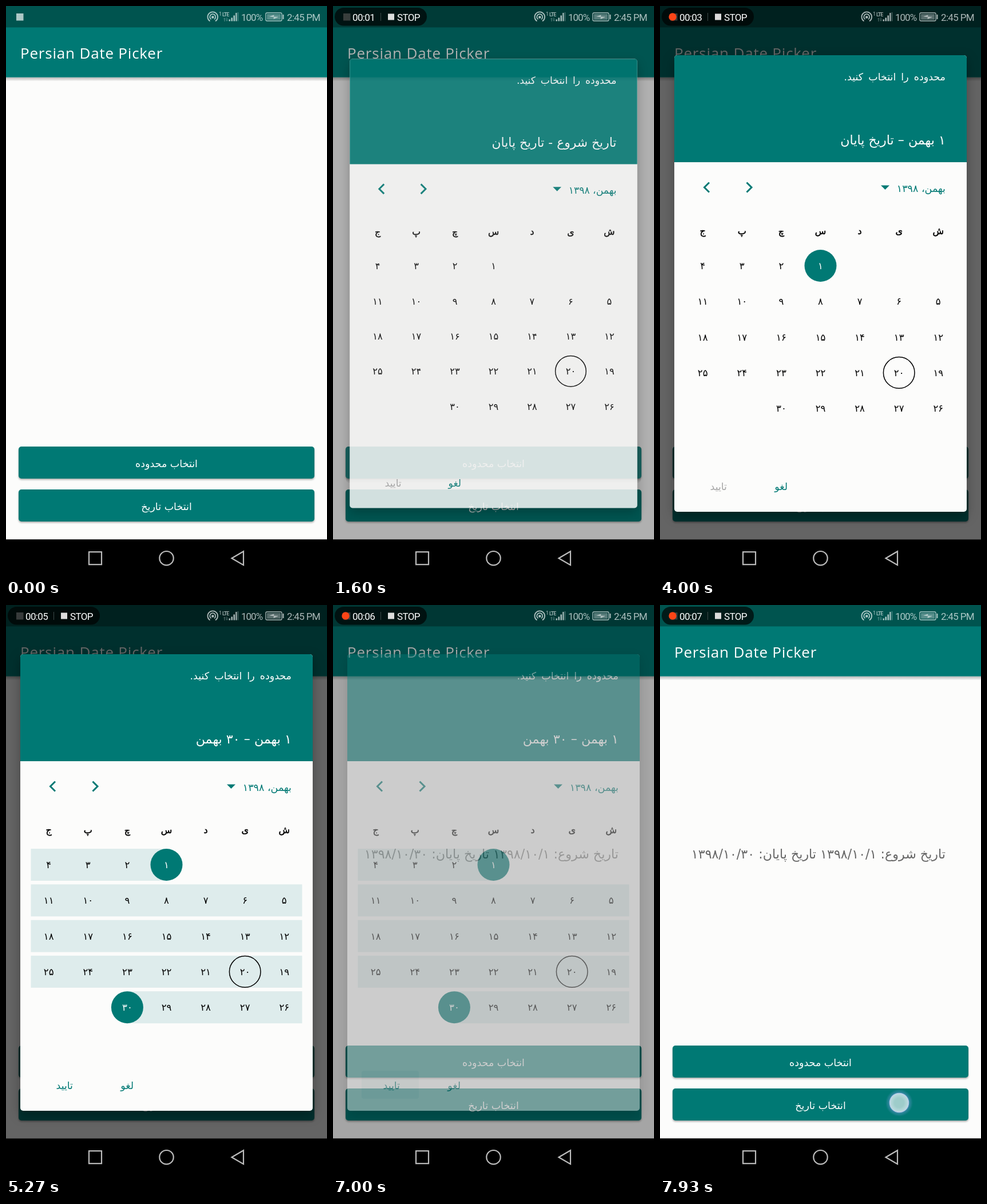
Write an HTML page that moves like this. It is 561x998 px and loops after 8000 ms.

```html
<!DOCTYPE html>
<html lang="en">
<head>
<meta charset="utf-8">
<title>Persian Date Picker</title>
<style>
  html, body { margin: 0; width: 100%; height: 100%; overflow: hidden; background: #000; }
  svg { display: block; width: 100vw; height: 100vh; }
  .fa { font-family: "DejaVu Sans", sans-serif; font-size: 17.5px; }
  .rtl { direction: rtl; }
  .mid { text-anchor: middle; }
  .big { font-size: 22.2px; }
  .hint { word-spacing: 3.5px; }
  .title { font: 26px "Open Sans", "Noto Sans", sans-serif; letter-spacing: .8px; }
  .sys { font: 17px Roboto, sans-serif; letter-spacing: -.65px; }
  .cell { font-size: 16.5px; }
  .week { font-size: 16px; stroke: #000; stroke-width: .5; }
  .teal { fill: #007974; }
  .white { fill: #fff; }
  .raised { filter: drop-shadow(0 2px 1.5px rgba(0,0,0,.32)); }
  .card { fill: #fcfcfb; filter: drop-shadow(0 7px 10px rgba(0,0,0,.3)); }
  .line { fill: none; stroke: #bdbdbd; stroke-width: 2.2; }
</style>
</head>
<body>
<svg viewBox="0 0 561 998" preserveAspectRatio="none">
  <defs>
    <clipPath id="card"><rect x="25" y="86" width="511" height="798" rx="5"/></clipPath>
    <clipPath id="btn"><rect x="22" y="770" width="517" height="56" rx="5"/></clipPath>
    <radialGradient id="halo">
      <stop offset=".68" stop-color="#8ea2f0" stop-opacity="0"/>
      <stop offset=".7" stop-color="#8ea2f0" stop-opacity=".4"/>
      <stop offset="1" stop-color="#8ea2f0" stop-opacity="0"/>
    </radialGradient>
    <radialGradient id="tip">
      <stop offset=".5" stop-color="#fff" stop-opacity=".62"/>
      <stop offset="1" stop-color="#f4f7ff" stop-opacity=".78"/>
    </radialGradient>
    <linearGradient id="drop" x2="0" y2="1">
      <stop stop-opacity=".27"/><stop offset="1" stop-opacity="0"/>
    </linearGradient>
  </defs>

  <g id="app">
    <rect width="561" height="932.5" fill="#fcfcfb"/>
    <rect y="124.7" width="561" height="7" fill="url(#drop)"/>
    <rect y="37" width="561" height="87.7" class="teal"/>
    <rect width="561" height="37.4" fill="#00544f"/>
    <text x="25" y="92" class="title white">Persian Date Picker</text>
    <text id="result" x="499" y="443" class="fa rtl big" fill="#666">تاریخ شروع: ۱۳۹۸/۱۰/۱ تاریخ پایان: ۱۳۹۸/۱۰/۳۰</text>
    <rect id="lift" x="23" y="776" width="515" height="57" rx="5"/>
    <rect x="22" y="770" width="517" height="56" rx="5" class="teal raised"/>
    <g clip-path="url(#btn)" fill="#fff">
      <rect id="flash" x="22" y="770" width="517" height="56"/>
      <circle id="ripple"/>
    </g>
    <text x="280.5" y="806" class="fa rtl mid white">انتخاب محدوده</text>
    <rect x="22" y="845" width="517" height="56" rx="5" class="teal raised"/>
    <text x="280.5" y="881" class="fa rtl mid white">انتخاب تاریخ</text>
  </g>
  <rect id="dim" width="561" height="932.5"/>

  <g id="dialog">
    <rect x="25" y="86" width="511" height="798" rx="5" class="card"/>
    <rect x="25" y="86" width="511" height="187" class="teal" clip-path="url(#card)"/>
    <text x="499" y="130" class="fa rtl hint white">محدوده را انتخاب کنید.</text>
    <text id="range" x="499" y="242" class="fa rtl big white"></text>
    <text x="499" y="325" class="fa rtl teal">بهمن، ۱۳۹۸</text>
    <path d="M386 313.5h15l-7.5 7.5z" class="teal"/>
    <path d="M86 308.5l-8.5 8.5 8.5 8.5M151.500 308.5l8.5 8.5-8.5 8.5" fill="none" stroke="#007974" stroke-width="3"/>
    <g id="bands" fill="#deecec"></g>
    <g id="days"></g>
    <rect id="press" x="50" y="814" width="100" height="49" rx="4" class="teal"/>
    <text id="ok" x="117" y="846" class="fa rtl">تایید</text>
    <text x="223" y="846" class="fa rtl teal">لغو</text>
  </g>

  <g fill="#fff" stroke="#fff" opacity=".68">
    <path d="M356.5 26.5a8.8 8.8 0 1 1 9.5 0M358.5 23.3a5 5 0 1 1 5.5 0" fill="none" stroke-width="1.8"/>
    <g stroke="none">
      <circle cx="361.3" cy="19.5" r="2.3"/>
      <text x="372" y="17" style="font:9px Roboto,sans-serif">1</text>
      <text x="378" y="17.5" style="font:500 9px Roboto,sans-serif;letter-spacing:-1.1px">LTE</text>
      <path d="M382 20.5l2 2.5h-1.3v4h-1.4v-4h-1.3zM386 27l2-2.5h-1.3v-4h-1.4v4h-1.3z" opacity=".4"/>
      <path d="M389.5 23.5h2.5v3h-2.5zM393.5 20.5h2.5v6h-2.5zM397.5 16.5h2.5v10h-2.5zM401.3 12h2.2v14.5h-2.2z"/>
      <path d="M404.8 11h1.4v15.5h-1.4z" opacity=".45"/>
      <text x="411" y="26" class="sys" style="letter-spacing:-1px">100%</text>
      <text x="491" y="26" class="sys">2:45 PM</text>
      <rect x="456" y="14" width="24" height="10" opacity=".5"/>
      <path d="M483.5 15h2v8h-2z"/>
      <path d="M460 18.5l8.5-3-.5 3 8.5 .5-9 4 .5-3.5z"/>
      <rect x="18" y="13" width="12.5" height="12.5"/>
    </g>
    <rect x="454" y="12" width="28" height="14" rx="2" fill="none" stroke-width="1.3"/>
  </g>

  <g id="pill">
    <rect x="3" y="3" width="161" height="31.5" rx="15.7" fill-opacity=".68"/>
    <circle id="dot" cx="22" cy="19" r="6.7" fill="#fb4517"/>
    <text id="clock" x="34" y="26" class="sys white"></text>
    <path d="M83.5 12v14" stroke="#3c4a49"/>
    <rect x="96" y="13.5" width="11" height="11" fill="#dcdcdc"/>
    <text x="112" y="26" class="sys white">STOP</text>
  </g>

  <rect y="932.5" width="561" height="66"/>
  <g class="line">
    <rect x="145" y="954.2" width="22" height="22"/>
    <circle cx="280.5" cy="965.2" r="12.2"/>
    <path d="M394.5 965.2l20.5-12v24z"/>
  </g>

  <g id="touch">
    <circle r="24" fill="url(#halo)"/>
    <circle r="16.5" fill="url(#tip)" stroke="#c5d1f3" stroke-opacity=".8" stroke-width="1.5"/>
  </g>
</svg>
<script>
const LOOP = 8000;
const $ = id => document.getElementById(id);
const set = (el, attrs) => { for (const k in attrs) el.setAttribute(k, attrs[k]); return el; };
const add = (parent, tag, attrs, text = '') => {
  const el = set(document.createElementNS('http://www.w3.org/2000/svg', tag), attrs);
  el.textContent = text;
  return parent.appendChild(el);
};
const ramp = (t, a, b) => Math.min(1, Math.max(0, (t - a) / (b - a)));
const easeOut = p => 1 - (1 - p) ** 2;
const fa = n => String(n).replace(/\d/g, d => String.fromCharCode(0x6f0 + +d));

// Calendar grid: columns run from right to left.
const colX = c => 486.3 - 68.6 * c;
const rowY = r => 454 + 62.3 * r;
const spot = n => [colX((n + 2) % 7), rowY(Math.floor((n + 2) / 7))];

[...'شیدسچپج'].forEach((s, i) =>
  add($('days'), 'text', { x: colX(i), y: 399, class: 'fa week mid' }, s));

for (let r = 0; r < 5; r++) {
  const left = r === 4 ? spot(30)[0] : 43.5;
  const right = r ? 517.5 : spot(1)[0];
  add($('bands'), 'rect', { x: left, y: rowY(r) - 28, width: right - left, height: 56 });
}

const discs = {}, nums = {};
for (let n = 1; n <= 30; n++) {
  const [x, y] = spot(n);
  if (n === 1 || n === 30) discs[n] = add($('days'), 'circle', { cx: x, cy: y, r: 28, class: 'teal' });
  if (n === 20) add($('days'), 'circle', { cx: x, cy: y, r: 27.3, fill: 'none', stroke: '#000', 'stroke-width': 1.5 });
  nums[n] = add($('days'), 'text', { x, y: y + 6, class: 'fa cell mid' }, fa(n));
}

// Each touch: [down, fade start, gone, x, y]
const taps = [
  [1160, 1290, 1420, 399, 793],
  [3530, 3670, 3800, 281, 454],
  [4740, 4900, 5000, 212, 703],
  [6700, 6840, 6960, 95, 826],
  [7900, 8000, 8100, 418, 870]
];
const START = 3670, END = 4900, CLOSE = 6930;

function pick(n, on) {
  set(discs[n], { opacity: +on });
  set(nums[n], { fill: on ? '#fff' : '#000' });
}

function draw(t) {
  // Recorder pill
  set($('pill'), { opacity: ramp(t, 130, 230) });
  const beat = (t + 400) % 1000;
  set($('dot'), { opacity: ramp(beat, 0, 100) * (1 - ramp(beat, 480, 580)) });
  $('clock').textContent = '00:0' + Math.max(0, Math.floor((t - 130) / 1000));

  // Button press
  const grow = ramp(t, 1265, 1525), fade = 1 - ramp(t, 1480, 1680);
  set($('flash'), { opacity: .16 * ramp(t, 1240, 1320) * fade });
  set($('ripple'), {
    cx: 399 - 118.5 * grow, cy: 793 + 5 * grow, r: 18 + 242 * grow,
    opacity: grow ? .2 * fade : 0
  });
  set($('lift'), { opacity: .2 * ramp(t, 1240, 1330) * fade });

  // Dialog and shade
  const open = ramp(t, 1470, 1690), shut = ramp(t, CLOSE, 7060);
  const zoom = .9 + .1 * easeOut(open);
  set($('dim'), { opacity: .6 * ramp(t, 1470, 1730) * (1 - ramp(t, CLOSE, 7098)) });
  set($('dialog'), {
    opacity: easeOut(open) * (1 - shut),
    transform: `translate(280.5 485) scale(${zoom}) translate(-280.5 -485)`
  });
  set($('result'), { opacity: +(t >= CLOSE) });

  // Chosen days
  const from = t >= START, to = t >= END;
  pick(1, from);
  pick(30, to);
  set($('bands'), { opacity: +to });
  $('range').textContent =
    to ? '۱ بهمن – ۳۰ بهمن' : from ? '۱ بهمن – تاریخ پایان' : 'تاریخ شروع - تاریخ پایان';
  set($('ok'), { fill: to ? '#007974' : '#a6a6a6' });
  set($('press'), { opacity: .06 * ramp(t, 6760, 6860) });

  const tap = taps.find(p => t >= p[0] && t < p[2]);
  set($('touch'), tap
    ? { opacity: 1 - ramp(t, tap[1], tap[2]), transform: `translate(${tap[3]} ${tap[4]})` }
    : { opacity: 0 });
}

const t0 = performance.now();
function tick() {
  draw((performance.now() - t0) % LOOP);
  requestAnimationFrame(tick);
}
tick();
</script>
</body>
</html>
```
